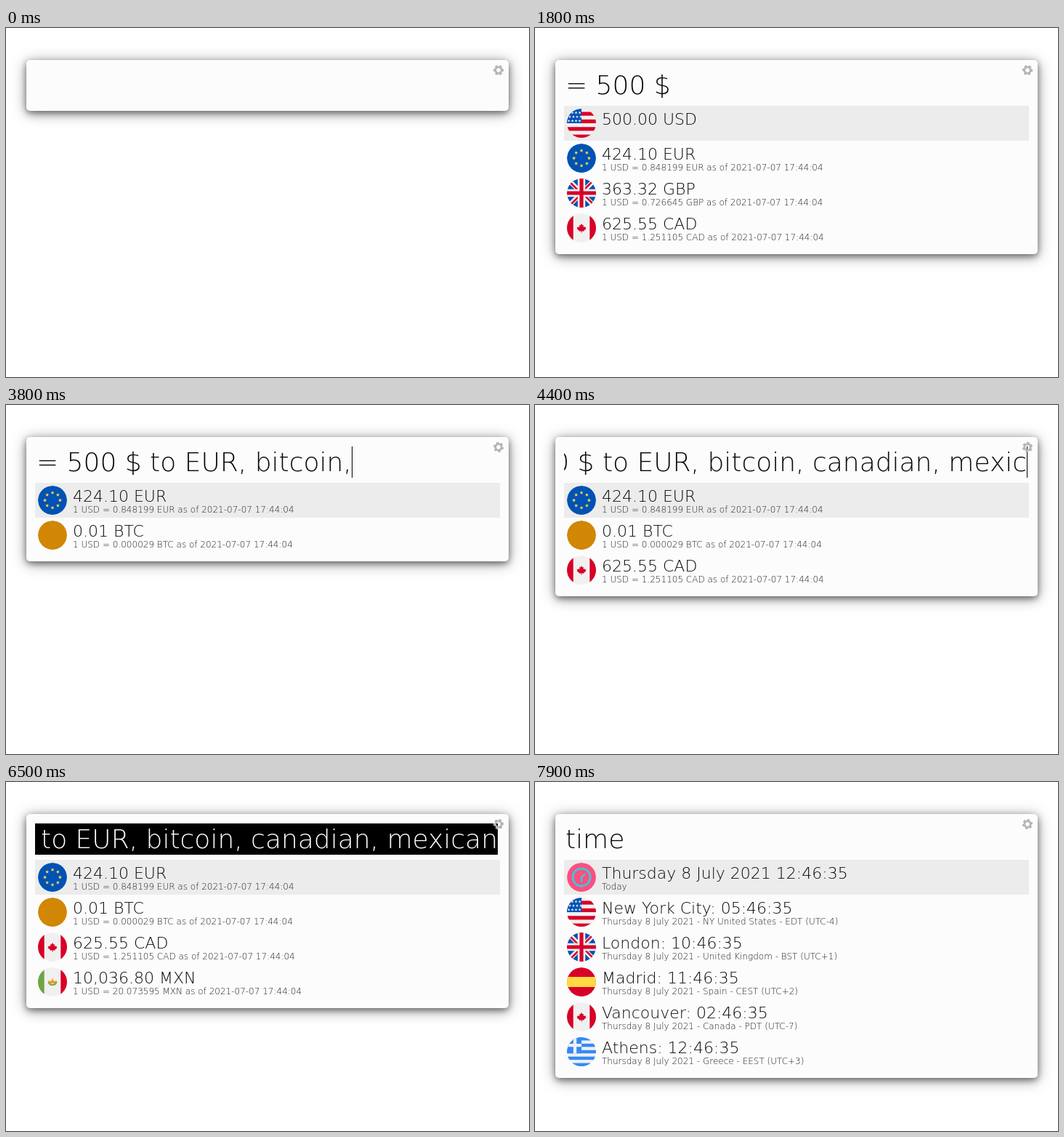
Recreate the animation shown at these times as an HTML page. Size 720x480 px, loop 8 s.

```html
<!DOCTYPE html>
<html lang="en">
<head>
<meta charset="utf-8">
<title>Launcher: currencies and time zones</title>
<style>
  html, body { margin: 0; width: 100%; height: 100%; overflow: hidden; background: #fff; }
  #stage { position: absolute; left: 0; top: 0; width: 720px; height: 480px; overflow: hidden; }
  #panel {
    position: absolute; left: 28px; top: 44px; width: 664px; border-radius: 5px;
    background: #fcfcfc;
    box-shadow: 0 3px 8px rgba(0, 0, 0, .45), 0 3px 20px rgba(0, 0, 0, .4);
  }
  svg { position: absolute; left: 0; top: 0; }
  text { font-family: "DejaVu Sans", sans-serif; font-weight: 200; white-space: pre; fill: #0a0a0a; }
  #query { font-size: 36px; }
  #query.selected { fill: #fff; }
  .title { font-size: 22px; }
  .note { font-size: 12px; fill: #222; }
</style>
</head>
<body>
<div id="stage">
  <div id="panel"></div>
  <svg width="720" height="480" viewBox="0 0 720 480">
    <defs>
      <clipPath id="field"><rect x="40" y="50" width="640" height="54"/></clipPath>
      <clipPath id="disc"><circle r="20"/></clipPath>
    </defs>
    <g id="rows"></g>
    <rect id="selection" x="40" y="57" width="637" height="43"/>
    <g clip-path="url(#field)"><text id="query" y="91" xml:space="preserve"></text></g>
    <rect id="caret" y="57" width="1" height="43"/>
    <g id="gear" fill="none" stroke="#b4b4b4"></g>
  </svg>
</div>
<script>
const $ = id => document.getElementById(id);
const RED = '#d80027', BLUE = '#0052b4', PALE = '#f0f0f0', GOLD = '#ffda44';
const PINK = '#ff4f7e', TEAL = '#45c1d6';

// ---- icons, drawn around 0,0 with radius 20 ----
const rect = (x, y, w, h, fill) => `<rect x="${x}" y="${y}" width="${w}" height="${h}" fill="${fill}"/>`;
const line = (d, color, width) => `<path d="${d}" fill="none" stroke="${color}" stroke-width="${width}"/>`;
const disc = fill => `<circle r="20" fill="${fill}"/>`;
const poly = (pts, fill) => `<polygon points="${pts.join(' ')}" fill="${fill}"/>`;
const range = n => [...Array(n).keys()];

function star(cx, cy, r, fill) {
  return poly(range(10).map(i => {
    const a = i * Math.PI / 5 - Math.PI / 2, q = i % 2 ? r * .42 : r;
    return [cx + q * Math.cos(a), cy + q * Math.sin(a)];
  }), fill);
}

function leaf() {
  const half = [[0, -6], [1.5, -3.6], [2.9, -4.3], [2.5, -.8], [4, -2.1], [4.6, -1.1], [6.3, -1.3],
    [5.5, .6], [6.4, 1.2], [3.2, 3.8], [3.4, 4.7], [.5, 4.2], [.5, 6.5]];
  return poly([...half, ...half.map(([x, y]) => [-x, y]).reverse()], RED);
}

const sides = (left, right) => disc(PALE) + rect(-20, -20, 8.7, 40, left) + rect(11.3, -20, 8.7, 40, right);

const icons = {
  us: disc(PALE)
    + [-15.6, -5.2, 5.2, 15.6].map(y => rect(-20, y, 40, 5.2, RED)).join('')
    + rect(-20, -20, 20, 20, BLUE)
    + range(12).map(i => {
        const row = i >> 2;
        return star(-17.5 + (i % 4) * 5 + (row % 2) * 1.5, -14.5 + row * 5.6, 2.1, PALE);
      }).join(''),
  eu: disc(BLUE) + range(8).map(i => {
    const a = i * Math.PI / 4;
    return star(10.4 * Math.cos(a), 10.4 * Math.sin(a), 2.7, GOLD);
  }).join(''),
  gb: disc(BLUE)
    + line('M-20-20L20 20M20-20L-20 20', PALE, 6.4)
    + line('M-20-19L-2-1M20 19L2 1M19-20L1-2M-19 20L-1 2', RED, 2.5)
    + line('M0-20V20M-20 0H20', PALE, 10.4)
    + line('M0-20V20M-20 0H20', RED, 5.2),
  ca: sides(RED, RED) + leaf(),
  mx: sides('#6da544', RED)
    + line('M-5.5-.5A5.6 5.6 0 0 0 5.5-.5', '#6da544', 2)
    + '<path d="M-6-2L-2-1L0-5L2-1L6-2L3 2H-3Z" fill="#ff9811"/>',
  es: disc(RED) + rect(-20, -7, 40, 14, GOLD),
  gr: disc(PALE)
    + range(5).map(i => rect(-20, -20 + i * 80 / 9, 40, 40 / 9, '#338af3')).join('')
    + rect(-20, -20, 20, 22.2, '#338af3')
    + line('M-9-20V2.2M-20-8.9H0', PALE, 4.4),
  coin: disc('#d18604'),
  calc: disc(PINK)
    + line('M-12.5-6.5H-3.5M-8-11V-2', TEAL, 2.6)
    + line('M3-6.5H12', '#fff', 2.6)
    + line('M-12 4L-4 11M-4 4L-12 11', '#ffd93b', 2.6)
    + line('M3 7H12M6.2 3H8.8M6.2 11H8.8', '#4a4560', 2.4),
  clock: disc(PINK)
    + `<circle r="12" fill="none" stroke="${TEAL}" stroke-width="3"/>`
    + line('M0 6.5V0L5-4.5', TEAL, 2.6)
};

// ---- results ----
const rate = (icon, title, code, value) =>
  [icon, `${title} ${code}`, `1 USD = ${value} ${code} as of 2021-07-07 17:44:04`];
const city = (icon, name, time, zone) =>
  [icon, `${name}: ${time}:46:35`, `Thursday 8 July 2021 - ${zone}`];

const USD = ['us', '500.00 USD', ''];
const EUR = rate('eu', '424.10', 'EUR', '0.848199');
const GBP = rate('gb', '363.32', 'GBP', '0.726645');
const CAD = rate('ca', '625.55', 'CAD', '1.251105');
const BTC = rate('coin', '0.01', 'BTC', '0.000029');
const MXN = rate('mx', '10,036.80', 'MXN', '20.073595');
const HINT = ['calc', 'Keep typing your query ...',
  'Try expressions like "10 euros to dollars", "sqrt(10) + 2 ^ 2.5", "20 cm to inches"'];
const TIMES = [
  ['clock', 'Thursday 8 July 2021 12:46:35', 'Today'],
  city('us', 'New York City', '05', 'NY United States - EDT (UTC-4)'),
  city('gb', 'London', '10', 'United Kingdom - BST (UTC+1)'),
  city('es', 'Madrid', '11', 'Spain - CEST (UTC+2)'),
  city('ca', 'Vancouver', '02', 'Canada - PDT (UTC-7)'),
  city('gr', 'Athens', '12', 'Greece - EEST (UTC+3)')
];
const TARGETS = { EUR, bitcoin: BTC, canadian: CAD, mexican: MXN };

function results(query) {
  if (query.startsWith('t')) return query.startsWith('time') ? TIMES : [];
  if (!query.includes('$')) return query.length > 1 ? [HINT] : [];
  const found = Object.keys(TARGETS).filter(k => query.includes(k)).map(k => TARGETS[k]);
  return found.length ? found : [USD, EUR, GBP, CAD];
}

// ---- timeline ----
const LOOP = 8000, STEP = 100, SELECT = 6400, RETYPE = 6800;
const MONEY = '= 500 $ to EUR, bitcoin, canadian, mexican', TIME = 'time ';
// [ms, characters typed]
const moneyKeys = [[0, 0], [900, 0], [1000, 2], [1100, 5], [1200, 7], [3200, 7], [3300, 10],
  [3800, 24], [4400, 40], [4500, 42], [LOOP, 42]];
const timeKeys = [[RETYPE, 0], [7000, 5], [LOOP, 5]];

function typed(keys, t) {
  const i = keys.findIndex(k => k[0] > t);
  const [t0, n0] = keys[i - 1], [t1, n1] = keys[i];
  return Math.floor(n0 + (n1 - n0) * (t - t0) / (t1 - t0) + 1e-6);
}

const queryAt = t => t > RETYPE ? TIME.slice(0, typed(timeKeys, t)) : MONEY.slice(0, typed(moneyKeys, t));

function caretOn(t, query) {
  let last = t;
  while (last > 0 && queryAt(last - STEP) === query) last -= STEP;
  if (last <= 0) last = -500;
  return (t - last) % 1000 < 500;
}

// ---- drawing ----
function drawRows(rows) {
  $('panel').style.height = (rows.length ? 75 + 48 * rows.length : 69.5) + 'px';
  $('rows').innerHTML = (rows.length ? rect(40, 107, 640, 48, '#ececec') : '') +
    rows.map(([icon, title, note], i) => `<g transform="translate(0 ${48 * i})">
      <g transform="translate(64 131)" clip-path="url(#disc)">${icons[icon]}</g>
      <text class="title" x="92" y="133">${title}</text>
      <text class="note" x="92" y="148">${note}</text></g>`).join('');
}

$('gear').innerHTML = '<circle r="4.2" stroke-width="2.6"/>' +
  range(6).map(i => `<path d="M4.8 0H7" stroke-width="3.6" transform="rotate(${60 * i})"/>`).join('');

let shown = null;
function draw(now) {
  const t = Math.floor(now % LOOP / STEP) * STEP;
  const query = queryAt(t), selected = t >= SELECT && t <= RETYPE;
  const text = $('query');
  if (query !== shown) {
    shown = query;
    text.textContent = query;
    drawRows(results(query));
  }
  const width = query ? text.getComputedTextLength() : 0;
  const x = Math.min(42, 677 - width);
  text.setAttribute('x', x);
  text.setAttribute('class', selected ? 'selected' : '');
  $('selection').style.display = selected ? '' : 'none';
  $('caret').setAttribute('x', Math.round(x + width));
  $('caret').style.display = !selected && caretOn(t, query) ? '' : 'none';
  $('gear').setAttribute('transform', `translate(678 58) rotate(${t * .036})`);
}

function tick() {
  draw(performance.now());
  requestAnimationFrame(tick);
}
tick();
</script>
</body>
</html>
```
